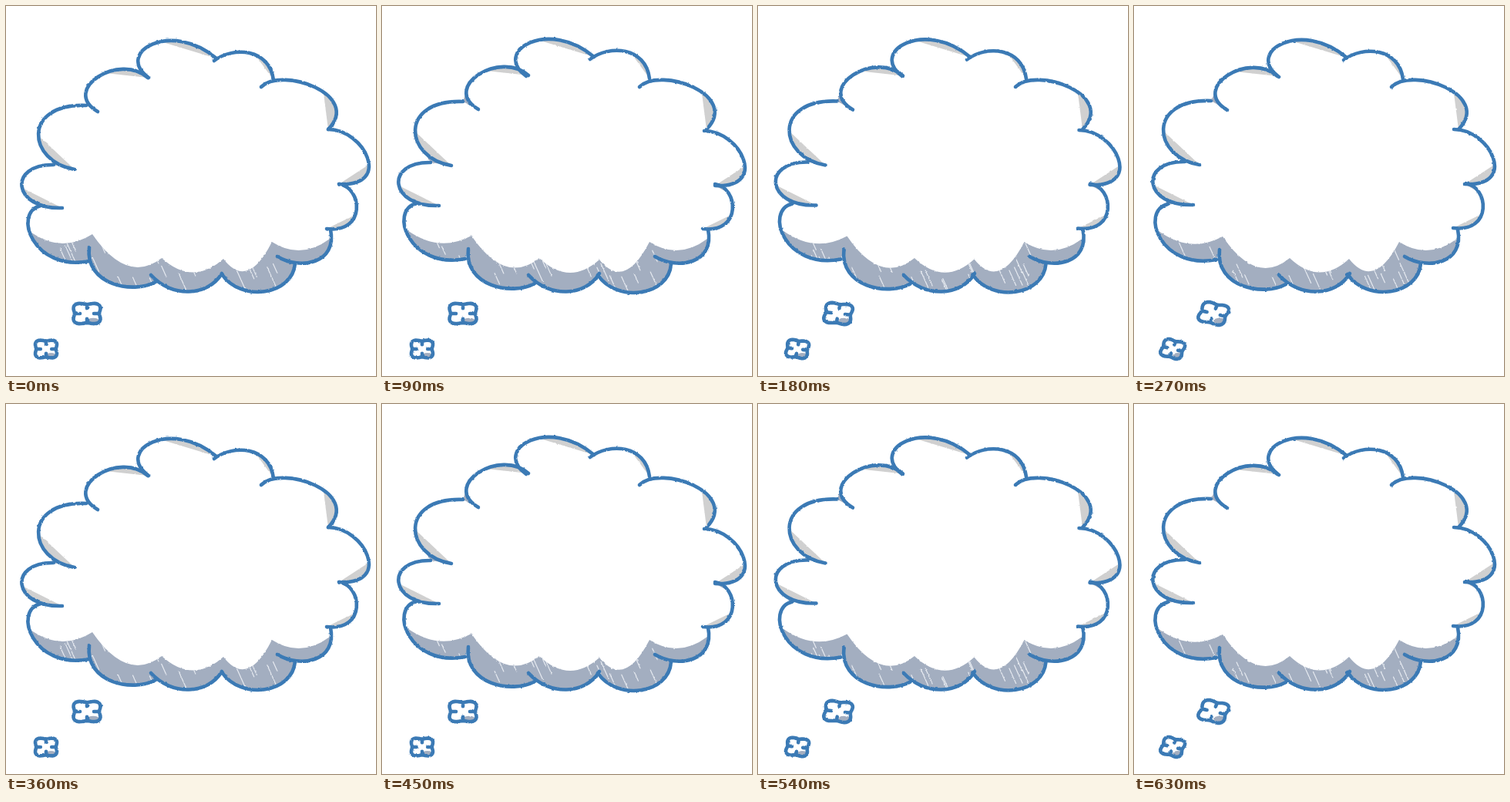
Animation, 480 px wide and 480 px high, one loop 0.72 s. Source, as an HTML page:

```html
<!DOCTYPE html>
<html lang="en">
<head>
<meta charset="utf-8">
<title>Thought bubble</title>
<style>
html, body { margin: 0; width: 100%; height: 100%; overflow: hidden; background: #fff; }
svg { display: block; width: 100vw; height: 100vh; }
.line { fill: none; stroke: #3b7ab5; stroke-width: 4.6; stroke-linecap: round; stroke-linejoin: round; }
.white { fill: #fff; }
.grey { fill: #d0d0d0; }
.blue { fill: #a3aec0; }
.hatch { fill: none; stroke: #e6eaf0; stroke-width: 1.2; stroke-linecap: round; }
</style>
</head>
<body>
<svg id="stage" viewBox="0 0 480 480"></svg>
<script>
// One Bezier curve per bump, clockwise from the top
const bumps = [
  [[185, 93], [140, 60], [215, 18], [273, 68]],
  [[270, 71], [295, 52], [342, 55], [347, 96]],
  [[331, 105], [358, 78], [462, 115], [418, 160]],
  [[418, 160], [465, 160], [502, 235], [432, 231]],
  [[432, 231], [462, 235], [468, 295], [416, 289]],
  [[421, 290], [430, 334], [382, 343], [352, 325]],
  [[375, 334], [372, 375], [305, 385], [280, 348]],
  [[280, 347], [262, 377], [215, 379], [188, 349]],
  [[194, 358], [165, 374], [102, 362], [108, 313]],
  [[108, 331], [35, 345], [8, 268], [45, 259]],
  [[73, 262], [8, 264], [2, 205], [62, 206]],
  [[89, 212], [28, 202], [20, 126], [104, 129]],
  [[119, 137], [70, 108], [148, 60], [184, 93]]
];
const under = [9, 8, 7, 6, 5];

// Peaks of the underside shade, left to right, and the dip after each
const peaks = [[33, 294, 13], [112, 296, 25], [202, 327, 18], [282, 328, 26], [345, 306, 13], [420, 302, 0]];

// How far each redrawing moves every bump, and how it turns the puffs
const still = { shift: bumps.map(() => [0, 0]), tilt: 0 };
const right = {
  shift: [[2, -2], [0, -2], [3, 0], [0, 2], [0, 0], [2, 0], [0, 1], [2, 0], [4, 2], [0, -3], [1, -3], [1, -5], [6, -3]],
  tilt: 0
};
const left = {
  shift: [[3, -1], [2, -1], [3, 0], [-3, 0], [-2, -1], [-1, 0], [-3, 0], [0, 0], [3, 3], [-1, -2], [4, -4], [-4, -6], [2, -2]],
  tilt: .3
};
const middle = {
  shift: right.shift.map(([x, y], i) => [(x + left.shift[i][0]) / 2, (y + left.shift[i][1]) / 2]),
  tilt: .15
};

const path = (cls, d) => `<path class="${cls}" d="${d}"/>`;
const poly = pts => "M" + pts.join("L") + "Z";

// Points along a bump from t = a to t = b
function part(p, a, b) {
  return Array.from({ length: 17 }, (_, i) => {
    const t = a + (b - a) * i / 16, u = 1 - t;
    return [0, 1].map(k =>
      u * u * u * p[0][k] + 3 * u * u * t * p[1][k] + 3 * u * t * t * p[2][k] + t * t * t * p[3][k]);
  });
}

function underside(outline, shift) {
  const outer = [...under].reverse().flatMap(i => part(outline[i], 0, i === 9 ? .65 : 1));
  const top = peaks.map(([x, y], i) => {
    const [dx, dy] = shift[under[Math.min(i, 4)]];
    return [x + dx, y + dy];
  });
  let d = "M" + outer.join("L") + "L" + top[0];
  for (let i = 1; i < top.length; i++) {
    const [[x, y], [X, Y]] = [top[i - 1], top[i]];
    d += `Q${(x + X) / 2} ${(y + Y) / 2 + 2 * peaks[i - 1][2]} ${X} ${Y}`;
  }
  return d + "Z";
}

function hatching(seed) {
  const rnd = () => (seed = seed * 16807 % 2147483647) / 2147483647;
  let d = "";
  for (let i = 0; i < 34; i++) {
    const x = 55 + 300 * rnd(), y = 300 + 55 * rnd(), len = 10 + 16 * rnd();
    d += `M${x} ${y}l${len * .45} ${len}`;
  }
  return path("hatch", d);
}

// Four-lobed puff with a crease between each pair of lobes
function puff(cx, cy, rx, ry, tilt) {
  const at = (a, r) => [cx + rx * r * Math.cos(a), cy + ry * r * Math.sin(a)];
  const turn = i => tilt + i * Math.PI / 2;
  const rim = Array.from({ length: 48 }, (_, i) => {
    const a = i * Math.PI / 24;
    return at(a, .94 - .14 * Math.cos(4 * (a - tilt)));
  });
  const creases = [0, 1, 2, 3].map(i => `M${at(turn(i), .8)}L${at(turn(i), .45)}`).join("");
  const [sx, sy] = at(1, .75);
  return path("white", poly(rim)) +
    `<ellipse class="blue" cx="${sx}" cy="${sy}" rx="${rx * .4}" ry="${ry * .25}"/>` +
    path("line", poly(rim) + creases);
}

function draw({ shift, tilt }, n) {
  const outline = bumps.map((b, i) => b.map(([x, y]) => [x + shift[i][0], y + shift[i][1]]));
  const shade = underside(outline, shift);
  // Right-hand bumps are shaded on their later half, left-hand ones on their earlier half
  const crescents = [0, 1, 2, 3, 4, 10, 11, 12].map(i => {
    const early = i === 10 || i === 11;
    return path("grey", poly(part(outline[i], early ? 0 : .58, early ? .48 : 1)));
  }).join("");
  const seams = [4, 10, 11, 12].map(i =>
    path("blue", poly([...part(outline[i], 0, .25), outline[i - 1][3]]))).join("");
  const lines = outline.map(([a, b, c, e]) => path("line", `M${a}C${b} ${c} ${e}`)).join("");
  return `<g><filter id="rough${n}" filterUnits="userSpaceOnUse" x="0" y="0" width="480" height="480" color-interpolation-filters="sRGB">
    <feTurbulence type="fractalNoise" baseFrequency=".3" numOctaves="1" seed="${n + 3}"/>
    <feDisplacementMap in="SourceGraphic" scale="2.5" xChannelSelector="R" yChannelSelector="G"/></filter>
    <clipPath id="under${n}">${path("", shade)}</clipPath>
    <g filter="url(#rough${n})">${path("blue", shade)}
    <g clip-path="url(#under${n})">${hatching(97 + n * 31)}</g>
    ${crescents}${seams}${lines}
    ${puff(105 - 6 * tilt, 399, 20, 15, tilt)}${puff(52 - 6 * tilt, 445, 16, 13, tilt)}</g></g>`;
}

const stage = document.getElementById("stage");
stage.innerHTML = [still, right, middle, left].map(draw).join("");
const poses = [...stage.children];

const start = performance.now();
function tick(now) {
  const step = Math.floor(Math.max(0, now - start) / 90) % poses.length;
  poses.forEach((g, i) => g.style.display = i === step ? "" : "none");
  requestAnimationFrame(tick);
}
tick(start);
</script>
</body>
</html>
```
